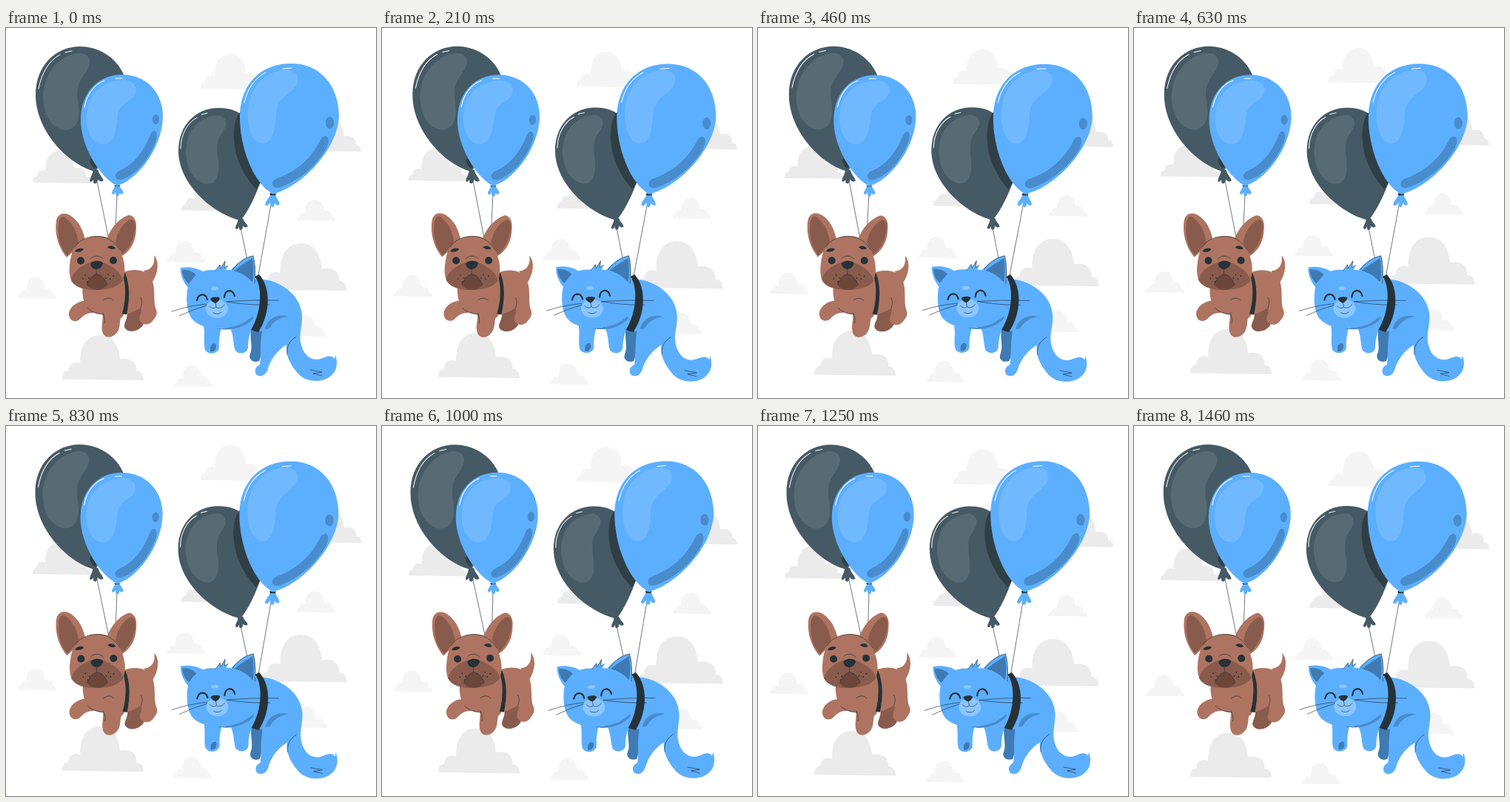
These frames come from a looping animation (500x500 px, 1.5 s). An HTML page:

```html
<!DOCTYPE html>
<html lang="en">
<head>
<meta charset="utf-8">
<title>Pets on balloons</title>
<style>
html, body { margin: 0; width: 100%; height: 100%; overflow: hidden; background: #fff; }
svg { display: block; width: 100vw; height: 100vh; }
.ink { fill: #263238; }
.line { fill: none; stroke: #263238; stroke-width: .65; stroke-linecap: round; }
.thick { stroke-width: 2.2; }
.shine { fill: none; stroke: #fff; stroke-width: 1; stroke-linecap: round; }
.slate { fill: #455a64; }
.slate-lit { fill: #586b74; }
.slate-dim { fill: #303f46; }
.blue { fill: #5cafff; }
.blue-lit { fill: #71b9ff; }
.blue-pale { fill: #8bc6ff; }
.blue-dim { fill: #498ccc; }
.blue-deep { fill: #407ab2; }
.fur { fill: #ae7461; }
.fur-dim { fill: #895b4c; }
.fur-deep { fill: #6d463a; }
.knot { stroke-width: 1.2; stroke-linejoin: round; }
.knot.slate { stroke: #455a64; }
.knot.blue { stroke: #5cafff; }
</style>
</head>
<body>
<svg viewBox="0 0 500 500">
  <defs>
    <path id="cloud" d="M0 28.200C0 24 2 23 4 22.500C4 18 8 16.500 11.500 18C11 7 16 0 24 0C32 0 36 6 37 15.500C43 14 48 17 47.500 23C51 23 52 26 52 28.900Z"/>
  </defs>
  <g id="sky"></g>

  <g id="dog">
    <path class="line" d="M123 207L138 281M150 225L148 273"/>
    <path class="slate" d="M121 194C88 187 40 142 40 90C40 50 68 25 100 25C130 25 153 45 160 66C166 95 148 150 121 194Z"/>
    <path class="slate-dim" d="M113 178C114 183 117 188 120 190L125 184L117 173Z"/>
    <path class="slate-lit" d="M98 34C112 34 117 44 110 56C103 68 94 76 97 96C101 120 98 137 80 138C62 136 50 118 50 92C51 60 74 36 98 34Z"/>
    <path class="shine" d="M44 82C48 61 58 44 73 36M80 33L89 31"/>
    <path class="slate knot" d="M118 193L124 192C125 198 130 202 131 206C127 209 125 204 123 203C124 207 122 211 119 209C118 207 119 205 119 203C117 205 116 208 114 207C113 203 118 199 118 193Z"/>
    <path class="blue" d="M150 213C128 203 100 160 101 122C102 85 126 63 157 63C190 63 213 88 212 122C210 165 175 207 150 213Z"/>
    <path class="blue-lit" d="M155 71C172 69 179 80 174 90C168 101 154 100 151 118C149 138 147 156 131 157C114 156 108 135 109 118C111 90 130 72 155 71Z"/>
    <ellipse class="blue-dim" cx="202.500" cy="123.500" rx="4.600" ry="6.800"/>
    <path class="blue-dim" d="M196 142C201 135 206 141 203 151C194 177 175 200 155 205C146 206 145 197 153 193C172 185 186 168 196 142Z"/>
    <path class="shine" d="M106 107C109 90 119 76 133 71M148 68L157 68"/>
    <path class="blue knot" d="M148 212H153C153 217 158 219 158 223C155 226 153 221 152 220C153 224 153 227 150 227C148 226 149 223 149 220C147 222 146 225 144 224C142 221 148 218 148 212Z"/>
    <path class="ink" d="M146 212C149 214 152 214 154 212L153 214H147Z"/>

    <path class="fur" d="M186 328C196 327 202 320 200 307C207 314 207 331 196 346Z"/>
    <path class="fur-dim" d="M161 378C168 390 159 397 160 404C163 412 176 411 182 405C189 400 187 390 188 372Z"/>
    <path class="fur" d="M104 346C102 358 104 370 110 379C117 386 128 388 140 387H163C171 384 177 381 182 378C185 384 178 391 181 396C185 402 193 402 198 396C203 390 205 386 203 381C198 370 203 353 197 340C191 326 172 324 156 331Z"/>
    <path class="fur" d="M108 369C98 368 86 376 85 386C85 395 92 398 98 395C103 391 106 385 118 385Z"/>
    <path class="fur" d="M129 380C133 392 128 400 130 409C131 417 138 420 145 416C155 410 153 400 155 392C159 390 160 386 160 380Z"/>
    <path class="line" d="M131 368C135 364 142 364 145 368M110 378C116 385 125 386 131 387M182 378C184 372 184 368 182 364M133 399C134 394 133 389 131 385"/>
    <path class="ink" d="M157 333C163 346 162 370 157 386L163 387C167 368 168 348 161 331Z"/>
    <path class="fur" d="M82 310C72 298 65 280 68 260C71 249 80 249 88 254C98 261 104 272 107 287Z"/>
    <path class="fur-dim" d="M83 308C73 297 69 281 71 264C73 254 78 253 82 258C91 266 96 275 98 290Z"/>
    <path class="fur" d="M136 285C142 270 152 258 165 253C172 252 177 260 176 270C176 286 170 300 157 308Z"/>
    <path class="fur-dim" d="M148 290C150 276 158 264 167 259C174 257 176 266 174 274C172 288 166 298 157 306Z"/>
    <path class="fur" d="M107 285C115 280 130 280 138 284C148 289 155 297 157 308C161 318 162 333 157 342C148 352 136 355 122 354C106 354 92 350 88 341C84 330 86 318 88 308C91 296 98 288 107 285Z"/>
    <path class="line" d="M93 296C97 289 107 282 122 281.500C137 281 148 290 154 300"/>
    <path class="fur-dim" d="M122 314C110 317 90 326 88 341C95 352 108 354 122 354C138 354 152 350 158 341C156 328 136 317 122 314Z"/>
    <path class="fur-deep" d="M109 347C113 338 118 333 123 333C128 333 133 338 137 347C131 356 115 356 109 347Z"/>
    <path class="line" d="M122 323V333M109 347C113 338 118 333 123 333C128 333 133 338 137 347M114 312C118 307 127 307 131 312"/>
    <path class="ink" d="M114 319C116 314 129 313 131 318C130 323 126 326 122 326C118 326 115 323 114 319ZM93 302C96 297 102 297 105 299C103 302 98 304 93 302ZM137 296C141 293 146 294 148 298C144 300 140 299 137 296Z"/>
    <circle class="ink" cx="101" cy="314.500" r="5"/>
    <circle class="ink" cx="145" cy="314" r="5"/>
    <g class="ink" id="freckles"></g>
  </g>

  <g id="cat">
    <path class="line" d="M317 270L326 313M358 239L341 334"/>
    <path class="slate" d="M317 260C281 252 233 212 233 166C233 130 258 108 287 108C305 108 315 113 325 123L345 205C338 225 328 247 317 260Z"/>
    <path class="slate-dim" d="M317 113C306 125 306 150 311 170C317 192 328 207 338 218L345 207L325 120Z"/>
    <path class="slate-lit" d="M285 118C297 118 301 130 293 140C283 152 285 165 287 180C289 203 282 211 271 211C253 208 243 188 243 166C244 138 262 119 285 118Z"/>
    <path class="shine" d="M236 163C236 144 245 128 258 121M264 117L272 115"/>
    <path class="slate knot" d="M314 258L320 258C320 262 325 264 326 268C323 271 321 267 319 266C320 270 319 273 316 272C315 270 316 268 315 266C314 269 313 272 311 271C309 268 315 264 314 258Z"/>
    <path class="blue" d="M361 224C335 212 315 160 316 118C317 75 345 48 385 48C425 48 450 78 450 120C447 168 395 217 361 224Z"/>
    <path class="blue-lit" d="M374 57C392 55 399 66 392 78C383 91 367 94 365 115C364 140 359 156 347 156C332 155 326 132 327 112C329 80 350 59 374 57Z"/>
    <ellipse class="blue-dim" cx="437.500" cy="128" rx="5.600" ry="8"/>
    <path class="blue-dim" d="M426 149C433 142 439 148 434 160C420 188 390 210 368 216C358 217 357 206 367 203C395 193 415 173 426 149Z"/>
    <path class="shine" d="M322 101C326 82 336 68 351 60M374 55L386 54"/>
    <path class="blue knot" d="M358 223L364 224C363 229 369 233 369 238C366 241 364 236 362 234C363 238 362 242 359 241C357 239 358 236 358 233C356 236 354 241 351 239C350 234 358 230 358 223Z"/>
    <path class="ink" d="M356.500 222.500C360 225 363 225 365 223L364 226H357Z"/>

    <path class="blue-deep" d="M331 406C329 420 334 432 330 440C327 448 334 453 342 450C346 440 347 425 352 410Z"/>
    <path class="blue" d="M266 398C270 412 266 425 269 435C274 443 287 440 288 432C287 420 290 410 292 400Z"/>
    <path class="blue" d="M300 400C309 415 306 425 310 436C315 442 326 440 327 432C327 420 330 410 335 400Z"/>
    <path class="blue-deep" d="M276 431C278 425 285 425 284 431C283 437 279 438 276 437Z"/>
    <path class="blue" d="M320 345C345 328 398 350 400 388C401 400 396 412 398 424C401 443 414 452 428 446C435 443 440 442 444 447L445 442C449 452 447 464 439 470C430 479 405 481 393 465C382 452 378 440 379 428C369 434 360 444 355 457C352 470 345 472 339 469C335 465 336 458 343 455C345 440 343 425 346 410L300 405Z"/>
    <path class="blue-dim" d="M350 407C353 393 367 385 381 390C369 391 361 397 356 406Z"/>
    <path class="line" d="M392 417C383 423 379 430 380 441M411 462L427 465L415 467L427 470"/>
    <path class="blue-dim" d="M284 406C303 406 322 400 334 389V393C322 406 301 410 284 406Z"/>
    <path class="ink" d="M336 336C346 346 347 382 331 408L341 411C358 385 358 350 342 333Z"/>
    <path class="blue" d="M246 351C238 342 235 330 236 324C246 322 260 324 269 331Z"/>
    <path class="blue-deep" d="M238 327C246 326 253 329 257 334L247 346C241 340 238 334 238 327Z"/>
    <path class="blue" d="M304 327C315 315 325 309 334 308C338 320 337 335 336 350Z"/>
    <path class="blue-deep" d="M306 330C316 321 326 316 333 311C335 322 335 334 333 344Z"/>
    <path class="blue" d="M246 349C252 336 262 328 275 327L284 327L289 320L290 325L296 315L295 324L300 321L297 327C313 326 332 337 338 352C344 370 338 390 318 400C295 409 265 408 252 394C243 383 243 362 246 349Z"/>
    <path class="line" d="M283 328L289 320L290 325L296 315L295 324L300 321M334 308C337 318 337 333 336 345M306 327C314 316 325 309 334 308"/>
    <ellipse class="blue-pale" cx="282" cy="352" rx="5" ry="2.500"/>
    <ellipse class="blue-pale" cx="285" cy="379.500" rx="15" ry="12.500"/>
    <path class="ink" d="M276 366C279 363 286 363 289 365C288 369 285 371 283 372C280 371 277 369 276 366Z"/>
    <path class="line" d="M283 371L284 377M275 376C278 380 283 379 284 377C287 380 293 378 295 374M280 385C283 387 288 387 291 384"/>
    <path class="line thick" d="M258 368C260 358 270 358 272 367M295 364C296 353 306 352 309 362"/>
    <path class="line" d="M271 373Q248 375 224 383M271 375Q253 380 234 389M298 370Q332 367 368 368M298 370Q330 375 356 374"/>
  </g>
</svg>
<script>
const NS = "http://www.w3.org/2000/svg";
const LOOP = 1500, STEPS = 36;
const el = id => document.getElementById(id);

function add(parent, tag, attrs) {
  const node = document.createElementNS(NS, tag);
  for (const key in attrs) node.setAttribute(key, attrs[key]);
  parent.appendChild(node);
}

// x, y, scale
const pale = [[263, 35, 1.66], [393, 232, 1], [217, 288, 1], [16, 337, 1], [381, 388, 1], [227, 456, 1]];
const grey = [[36, 166, 1.52], [237, 203, 1.54], [400, 122.5, 1.54], [345, 291, 2.22], [76, 415, 2.115]];
const drawClouds = (list, fill) => list.forEach(([x, y, s]) =>
  add(el("sky"), "use", { href: "#cloud", fill, transform: `translate(${x} ${y}) scale(${s})` }));
drawClouds(pale, "#f5f5f5");
drawClouds(grey, "#ebebeb");

[[107, 334], [112, 338], [104, 339], [110, 343], [135, 338], [138, 333], [141, 339], [145, 335]]
  .forEach(([cx, cy]) => add(el("freckles"), "circle", { cx, cy, r: 0.9 }));

// Triangle wave: 0, 1 at a quarter, -1 at three quarters
const swing = p => p < 0.25 ? p * 4 : p < 0.75 ? 2 - p * 4 : p * 4 - 4;
const float = p => -10 * (1 - Math.abs(1 - 2 * p));

function draw(ms) {
  const step = Math.floor((ms % LOOP + 4) * STEPS / LOOP) % STEPS;
  const p = step / STEPS;
  el("sky").setAttribute("transform", `translate(0 ${float(p)})`);
  el("dog").setAttribute("transform", `rotate(${swing(p)} 126 222)`);
  el("cat").setAttribute("transform", `rotate(${swing(p)} 337 263)`);
}

const start = performance.now();
function tick() {
  draw(performance.now() - start);
  requestAnimationFrame(tick);
}
tick();
</script>
</body>
</html>
```
